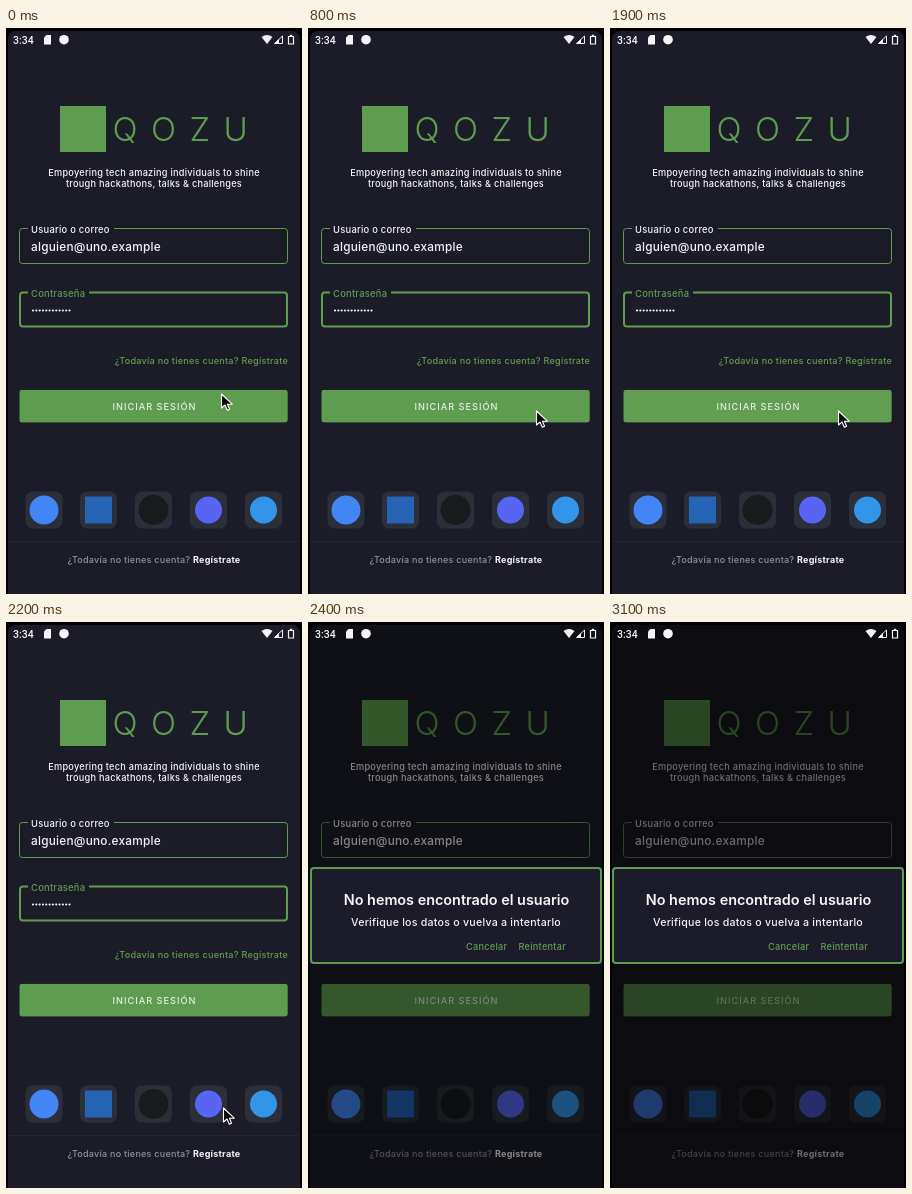
An HTML page that plays this animation: 296x566 px, repeating every 3200 ms.

```html
<!DOCTYPE html>
<html lang="es">
<head>
<meta charset="utf-8">
<title>Inicio de sesión</title>
<style>
  :root { --green: #5e9d4f; }
  html, body { margin: 0; width: 100%; height: 100%; overflow: hidden; background: #000; }
  svg { display: block; width: 296px; height: 566px; font-family: Inter, "Open Sans", sans-serif; font-weight: 500; letter-spacing: .25px; }
  .green { fill: var(--green); }
  .line { fill: none; stroke: var(--green); }
  .white { fill: #f4f4f6; }
  .mid { text-anchor: middle; }
  .end { text-anchor: end; }

  .cursor, .caret, .ripple, .shadow, .shade, .dialog { animation: 3.2s step-end infinite; }
  .cursor { animation-name: cursor; }
  .caret { animation-name: caret; }
  .ripple { animation-name: ripple; transform-origin: 228px 382px; }
  .shadow { animation-name: press; }
  .shade { animation-name: shade; }
  .dialog { animation-name: dialog; }

  /* 100 ms = 3.125% */
  @keyframes cursor {
    0% { transform: translate(215px, 366px); animation-timing-function: steps(6, end); }
    18.75% { transform: translate(228px, 383px); }
    62.5% { transform: translate(227px, 392px); }
    65.625% { transform: translate(223px, 429px); }
    68.75% { transform: translate(217px, 486px); }
    71.875%, 100% { transform: translate(212px, 600px); }
  }
  @keyframes caret {
    0% { opacity: 0; }
    6.25%, 21.875%, 37.5%, 53.125% { opacity: .5; }
    9.375%, 40.625% { opacity: 1; }
    25%, 56.25% { opacity: 0; }
    71.875%, 100% { opacity: 1; }
  }
  @keyframes ripple {
    0% { opacity: 0; transform: scale(.3); }
    46.875% { opacity: .09; transform: scale(.66); }
    50% { opacity: .08; transform: scale(1); animation-timing-function: steps(4, end); }
    62.5%, 100% { opacity: 0; transform: scale(1); }
  }
  @keyframes press {
    0% { opacity: 0; }
    46.875% { opacity: .3; animation-timing-function: steps(5, end); }
    62.5%, 100% { opacity: 0; }
  }
  @keyframes shade {
    0% { opacity: 0; }
    71.875% { opacity: .12; }
    75% { opacity: .45; }
    78.125% { opacity: .53; }
    81.25%, 100% { opacity: .56; }
  }
  @keyframes dialog {
    0% { opacity: 0; }
    71.875% { opacity: .7; }
    75%, 100% { opacity: 1; }
  }
</style>
</head>
<body>
<svg viewBox="0 0 296 566">
  <defs>
    <clipPath id="button"><rect x="13.3" y="361.8" width="268.4" height="32.7" rx="3"/></clipPath>
    <rect id="tile" x="-18.5" y="-18.5" width="37" height="37" rx="7" fill="#2b2f39"/>
    <path id="screen" d="M2 566V11A8 8 0 0 1 10 3H286A8 8 0 0 1 294 11V566Z"/>
  </defs>

  <use href="#screen" fill="#1c1c28"/>

  <rect class="green" x="54" y="78" width="46" height="46"/>
  <text class="green" x="106.5" y="113" font-size="33" font-weight="300" letter-spacing="13.5">QOZU</text>
  <g class="white mid" font-size="9.2">
    <text x="148" y="148">Empoyering tech amazing individuals to shine</text>
    <text x="148" y="158.5">trough hackathons, talks &amp; challenges</text>
  </g>

  <path class="line" d="M22 200.5H16.5Q13.5 200.5 13.5 203.5V232.5Q13.5 235.5 16.5 235.5H278.5Q281.5 235.5 281.5 232.5V203.5Q281.5 200.5 278.5 200.5H108"/>
  <text class="white" x="25" y="205" font-size="9.4">Usuario o correo</text>
  <text class="white" x="25" y="222.5" font-size="11.8">alguien@uno.example</text>

  <path class="line" stroke-width="2" d="M22 264.5H17Q14 264.5 14 267.5V295.5Q14 298.5 17 298.5H278Q281 298.5 281 295.5V267.5Q281 264.5 278 264.5H83"/>
  <text class="green" x="25" y="268.5" font-size="9.4">Contraseña</text>
  <path d="M27 282.5H64" stroke="#f4f4f6" stroke-width="2.2" stroke-linecap="round" stroke-dasharray="0 3.32"/>
  <rect class="caret green" x="64.3" y="274.5" width="1.5" height="15"/>

  <text class="green end" x="282" y="336" font-size="9.1">¿Todavía no tienes cuenta? Regístrate</text>

  <rect class="shadow" x="13" y="364" width="269" height="34" rx="4"/>
  <g clip-path="url(#button)">
    <rect class="green" x="13" y="361" width="269" height="34"/>
    <circle class="ripple" cx="228" cy="382" r="220" fill="#fff"/>
  </g>
  <text class="mid" x="148.5" y="382" font-size="9.2" letter-spacing="1" fill="#e4eee1">INICIAR SESIÓN</text>

  <g transform="translate(38 482)"><use href="#tile"/><circle r="14.5" fill="#4285f4"/></g>
  <g transform="translate(92.5 482)"><use href="#tile"/><rect x="-13.5" y="-13.5" width="27" height="27" fill="#2563b5"/></g>
  <g transform="translate(147.5 482)"><use href="#tile"/><circle r="15" fill="#191a1c"/></g>
  <g transform="translate(202.5 482)"><use href="#tile"/><circle r="13.5" fill="#5865f2"/></g>
  <g transform="translate(257.5 482)"><use href="#tile"/><circle r="13.5" fill="#3295ea"/></g>

  <path d="M2 513.5H294" stroke="#252531"/>
  <text class="mid" x="148" y="535" font-size="9" fill="#92929c">¿Todavía no tienes cuenta? <tspan class="white" font-weight="700">Regístrate</tspan></text>

  <use class="shade" href="#screen"/>

  <g class="white">
    <text x="7" y="15.8" font-size="10.5" font-family="Roboto, sans-serif" letter-spacing="0">3:34</text>
    <path d="M40.5 7H45V16.5H38V9.5Z"/>
    <circle cx="58" cy="11.7" r="4.8"/>
    <path d="M255.500 9Q261 4.800 266.500 9L261 16Z"/>
    <path d="M276.500 8V15.500H268.500Z" fill="none" stroke="#f4f4f6"/>
    <path d="M273 11V15.500H268.500Z"/>
    <path d="M282.500 8.500H287.500V16H282.500Z" fill="none" stroke="#f4f4f6" stroke-width="1.2"/>
    <rect x="283.8" y="6.8" width="2.4" height="1.5"/>
  </g>

  <g class="dialog">
    <rect x="3" y="246" width="290" height="95" rx="3" fill="#1c1b29" stroke="#5e9d4f" stroke-width="2"/>
    <g class="white mid">
      <text x="148.5" y="283" font-size="14.4" font-weight="600" letter-spacing="0">No hemos encontrado el usuario</text>
      <text x="148" y="303.8" font-size="10.6">Verifique los datos o vuelva a intentarlo</text>
    </g>
    <g class="green" font-size="9.2">
      <text x="158" y="328">Cancelar</text>
      <text class="end" x="258" y="328">Reintentar</text>
    </g>
  </g>

  <path class="cursor" d="M.5 0V14L4 11L6.300 16.200L8.600 15.200L6.400 10.200H11.200Z" fill="#0a0a0a" stroke="#fff" stroke-width="1.1" stroke-linejoin="round"/>
</svg>
</body>
</html>
```
